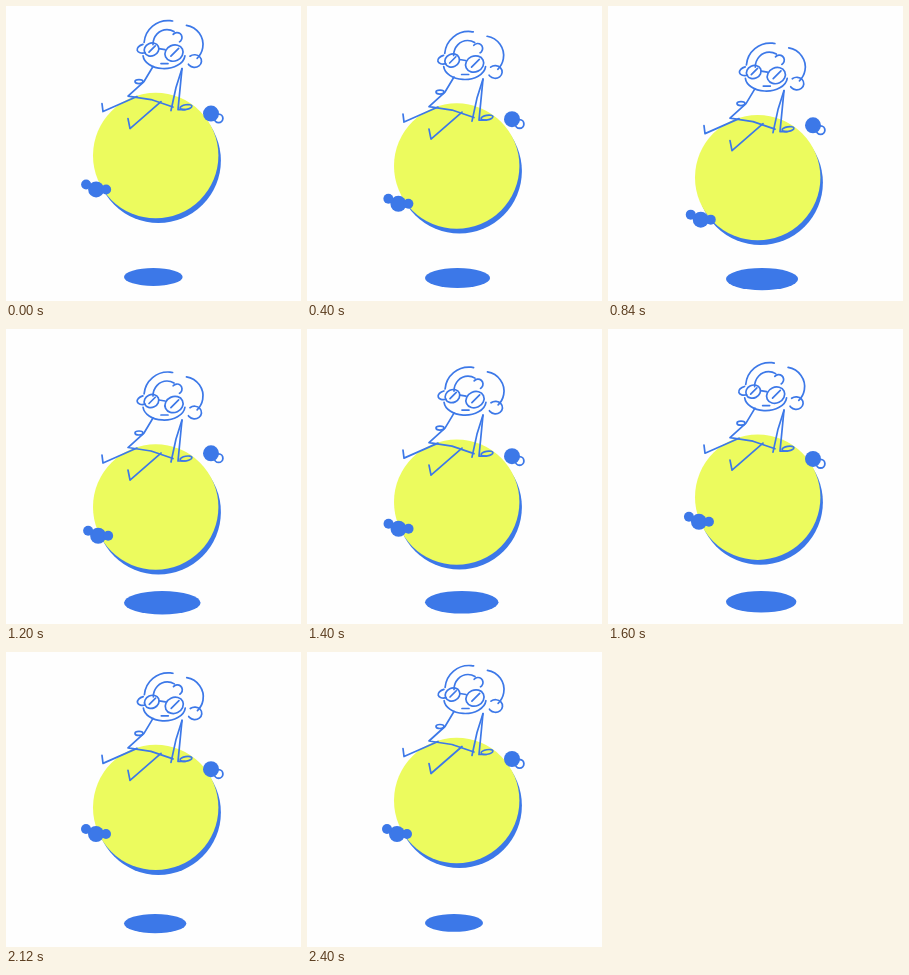
Animation of 295 by 295 pixels, one loop 2440 ms. Source, as an HTML page with a canvas:

```html
<!DOCTYPE html>
<html lang="en">
<head>
<meta charset="utf-8">
<title>Sitting on a floating ball</title>
<style>
html, body { margin: 0; width: 100%; height: 100%; overflow: hidden; background: #fefefe; }
canvas { display: block; width: 295px; height: 295px; }
</style>
</head>
<body>
<canvas id="stage" width="295" height="295"></canvas>
<script>
const ctx = document.getElementById('stage').getContext('2d');
const BLUE = '#3c78e8', YELLOW = '#ecfb5e', PAPER = '#fefefe';
const LOOP = 2440, STEP = 40, POSE_TIME = 400;
const TOP = 148.5;

const ramp = (u, a, b) => Math.min(1, Math.max(0, (u - a) / (b - a)));
const upDown = (u, peak, end) => u < peak ? ramp(u, 0, peak) : 1 - ramp(u, peak, end);
const rad = degrees => degrees * Math.PI / 180;

function dot(x, y, rx, color, ry = rx) {
  ctx.beginPath();
  ctx.ellipse(x, y, rx, ry, 0, 0, Math.PI * 2);
  ctx.fillStyle = color;
  ctx.fill();
}

function arc(x, y, rx, ry, from = 0, to = 360, tilt = 0) {
  ctx.beginPath();
  ctx.ellipse(x, y, rx, ry, rad(tilt), rad(from), rad(to));
  ctx.stroke();
}

function line(...points) {
  ctx.beginPath();
  points.forEach(([x, y]) => ctx.lineTo(x, y));
  ctx.stroke();
}

function drawHead() {
  // Hair
  arc(162, 38, 24, 24, 185, 281);
  arc(177, 38, 20, 19.5, -80, 45);
  arc(161, 38, 14, 15, 180, 300);
  arc(171, 31, 5, 5, 220, 420);
  // Ears and jaw
  arc(138, 42, 7, 4.3, 90, 270, -15);
  arc(188.5, 54.5, 7, 6.3, -130, 150);
  arc(158, 48, 21, 14, 5, 175);
  // Glasses and mouth
  for (const [x, y, r] of [[145.5, 43, 7.5], [168, 46.5, 9.3]]) {
    arc(x, y, r, r * 0.85, 0, 360, -25);
    line([x + r / 2, y - r / 2], [x - r / 3, y + r / 3]);
  }
  line([153, 42], [159, 43]);
  line([155, 57], [162, 57]);
}

function drawBody() {
  const hip = [122, 89.5], hem = [167, 100.5], shoulder = [176, 62];
  line([147, 60], [138, 75], hip, [145, 93], hem);
  arc(133, 75, 4, 2);
  line(shoulder, [170, 81], [165, 104]);
  line(shoulder, [172, 103], [179, 103]);
  arc(180, 100.5, 6, 2.3, 0, 360, -10);
  line([131, 90], [97, 105], [96, 97]);
  line([155, 95], [124, 122], [122, 112]);
}

function drawGirl(dy, pose) {
  ctx.save();
  ctx.strokeStyle = BLUE;
  ctx.lineWidth = 1.7;
  ctx.lineCap = ctx.lineJoin = 'round';
  ctx.translate(0, dy);
  drawBody();
  ctx.translate(-0.4 * Math.sin(pose * 2), 0.5 * Math.sin(pose));
  drawHead();
  ctx.restore();
}

function drawHands(u) {
  const left = upDown(u, 960, 1950);
  const x = 90 + 3 * left, y = 182 + 34.5 * left;
  dot(x, y, 8, BLUE);
  dot(x - 10, y - 5, 5, BLUE);
  dot(x + 10, y, 5, BLUE);

  const rightY = 107 + 24.6 * upDown(u, 1760, LOOP);
  ctx.strokeStyle = BLUE;
  ctx.lineWidth = 1.8;
  arc(212.6, rightY + 4.8, 4.3, 4.3);
  dot(205, rightY, 8, BLUE);
}

function drawFloorShadow(u) {
  // Grows from its fixed top-left corner.
  const rx = 29 + 9.6 * upDown(u, 1200, LOOP), ry = rx * 0.307;
  dot(118 + rx, 262 + ry, rx, BLUE, ry);
}

function draw() {
  const t = Math.floor(performance.now() % LOOP / STEP) * STEP;
  const u = (t + STEP) % LOOP;
  const drop = 31 * upDown(u, 1180, LOOP);

  ctx.fillStyle = PAPER;
  ctx.fillRect(0, 0, 295, 295);
  drawFloorShadow(u);
  dot(152.4, TOP + drop + 5, 62.5, BLUE);
  dot(149.7, TOP + drop, 62.7, YELLOW);
  drawHands(u);
  drawGirl(drop - 0.5, Math.floor(t / POSE_TIME) % 3);
  requestAnimationFrame(draw);
}
draw();
</script>
</body>
</html>
```
